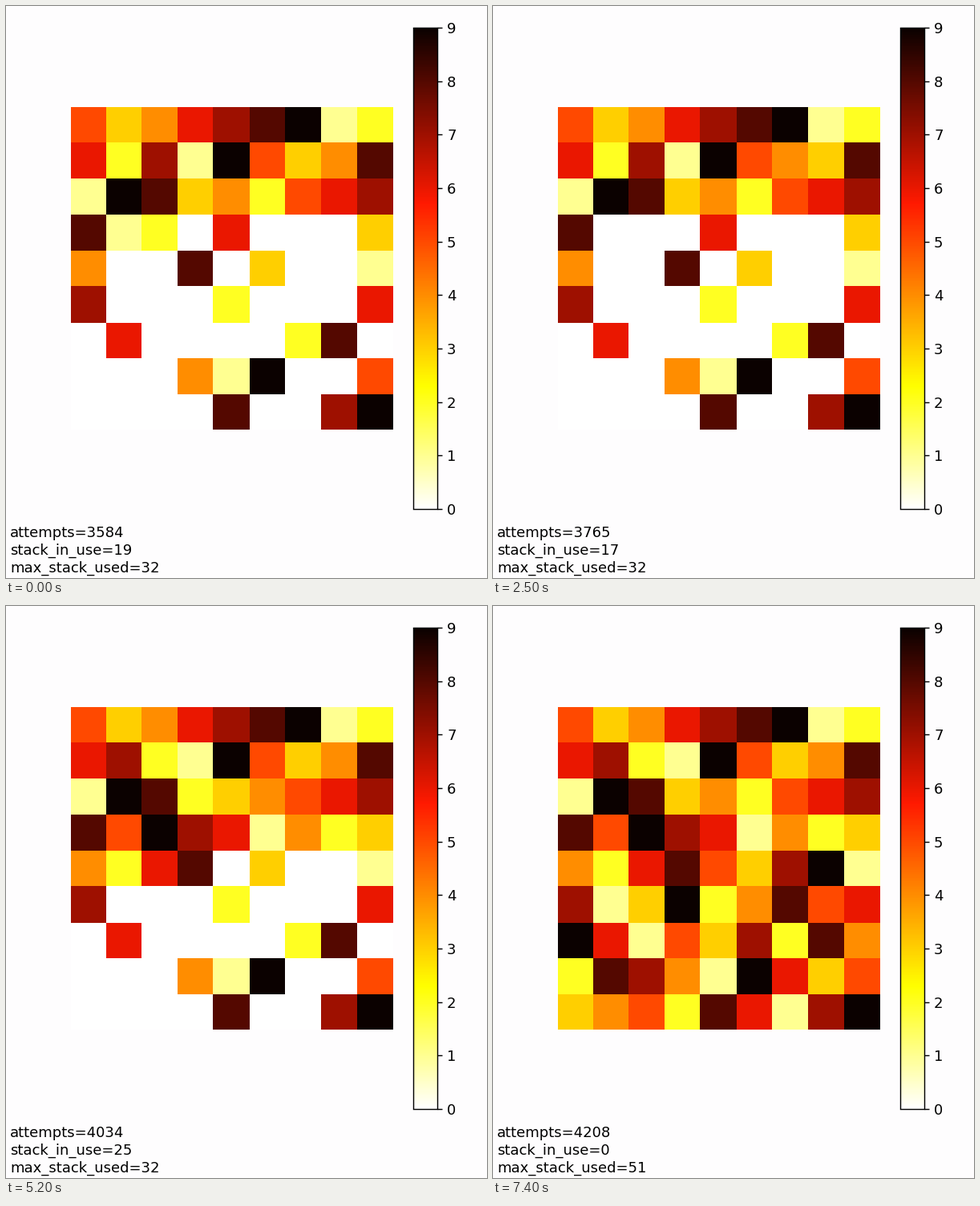
These frames come from a looping animation (600 px wide and 713 px high, 7.5 s). A matplotlib script:

```python
import numpy as np
import matplotlib.pyplot as plt
from matplotlib.animation import FuncAnimation
from matplotlib.colors import ListedColormap
from matplotlib.lines import Line2D

W, H, DPI = 600, 713, 128
FRAMES, INTERVAL = 75, 100

# The plot is laid out as a 500 x 600 figure, enlarged and cropped
SCALE, CROP_X, CROP_Y = 1.298, 1.1, 66.2
LEFT, TOP, CELL = 62.5, 148, 310 / 9

PUZZLE = """
53..7....
6..195...
.98....6.
8...6...3
4..8.3..1
7...2...6
.6....28.
...419..5
....8..79
"""

# (time in steps, attempts, stack depth, filled cells): pace of the search
PACE = [(0, 3584, 19, 19), (17, 3691, 20, 20), (25, 3765, 17, 17),
        (41, 3927, 12, 12), (52, 4034, 25, 25), (61, 4114, 24, 25)]
SOLVED_AT = 70


def fits(grid, r, c, v):
    br, bc = r // 3 * 3, c // 3 * 3
    return not (v in grid[r] or v in grid[:, c]
                or v in grid[br:br + 3, bc:bc + 3])


def search(grid):
    """Backtrack through the grid, logging every visible change."""
    cells = [tuple(rc) for rc in np.argwhere(grid == 0)]
    log = [(grid.copy(), 0, 0, 0)]

    def record(depth, placed=0):
        _, attempts, _, deepest = log[-1]
        log.append((grid.copy(), attempts + placed, depth,
                    max(deepest, depth)))

    def solve(i):
        if i == len(cells):
            return True
        r, c = cells[i]
        for v in range(1, 10):
            if fits(grid, r, c, v):
                grid[r, c] = v
                record(i + 1, placed=1)
                if solve(i + 1):
                    return True
                record(i)  # the counter drops before the cell clears
                grid[r, c] = 0
                record(i)
        return False

    solve(0)
    done, attempts, _, deepest = log[-1]
    log[-1] = (done, attempts, 0, deepest)
    return log


def cell_edges(start, crop):
    """Cell borders on whole layout pixels, in stage pixels."""
    snapped = np.floor(start + CELL * np.arange(10) + 0.5)
    return np.rint(snapped * SCALE - crop)


def warm_hot():
    """Reversed hot map with a little red leaking into green."""
    rgba = plt.get_cmap("hot_r")(np.linspace(0, 1, 256))
    rgba[:, 1] += 0.1 * (rgba[:, 0] - rgba[:, 1])
    return ListedColormap(rgba)


start = np.array([[int(ch) for ch in row.replace(".", "0")]
                  for row in PUZZLE.split()])
log = search(start.copy())
last = len(log) - 1

# placements + counter drops + cleared cells
steps = [p[0] for p in PACE] + [SOLVED_AT]
events = [3 * a - depth - filled for _, a, depth, filled in PACE] + [last]

fig = plt.figure(figsize=(W / DPI, H / DPI), dpi=DPI, facecolor="#fefdfe")

ax = fig.add_axes([0, 0, 1, 1])
ax.axis("off")
mesh = ax.pcolormesh(cell_edges(LEFT, CROP_X), cell_edges(TOP, CROP_Y),
                     start, cmap=warm_hot(), vmin=0, vmax=9)
ax.set(xlim=(0, W), ylim=(H, 0))

cax = fig.add_axes([507.6 / W, 1 - 626.8 / H, 30 / W, 599.8 / H])
fig.colorbar(mesh, cax=cax, ticks=range(10))
cax.tick_params(labelsize=10.15)

labels = [fig.text(5 / W, 1 - y / H, "", size=10.15, family="DejaVu Sans",
                   va="baseline") for y in (662.5, 684, 705.5)]
fig.add_artist(Line2D([0, 1], [0.5 / H] * 2, color="#c8c8c8",
                      lw=72 / DPI))


def draw(step):
    k = min(int(round(np.interp(step, steps, events))), last)
    grid, attempts, depth, deepest = log[k]
    mesh.set_array(grid)
    lines = (f"attempts={attempts}", f"stack_in_use={depth}",
             f"max_stack_used={deepest}")
    for label, line in zip(labels, lines):
        label.set_text(line)
    return [mesh, *labels]


anim = FuncAnimation(fig, draw, frames=FRAMES, interval=INTERVAL,
                     init_func=lambda: draw(0), repeat=True, repeat_delay=0)
plt.show()
```
